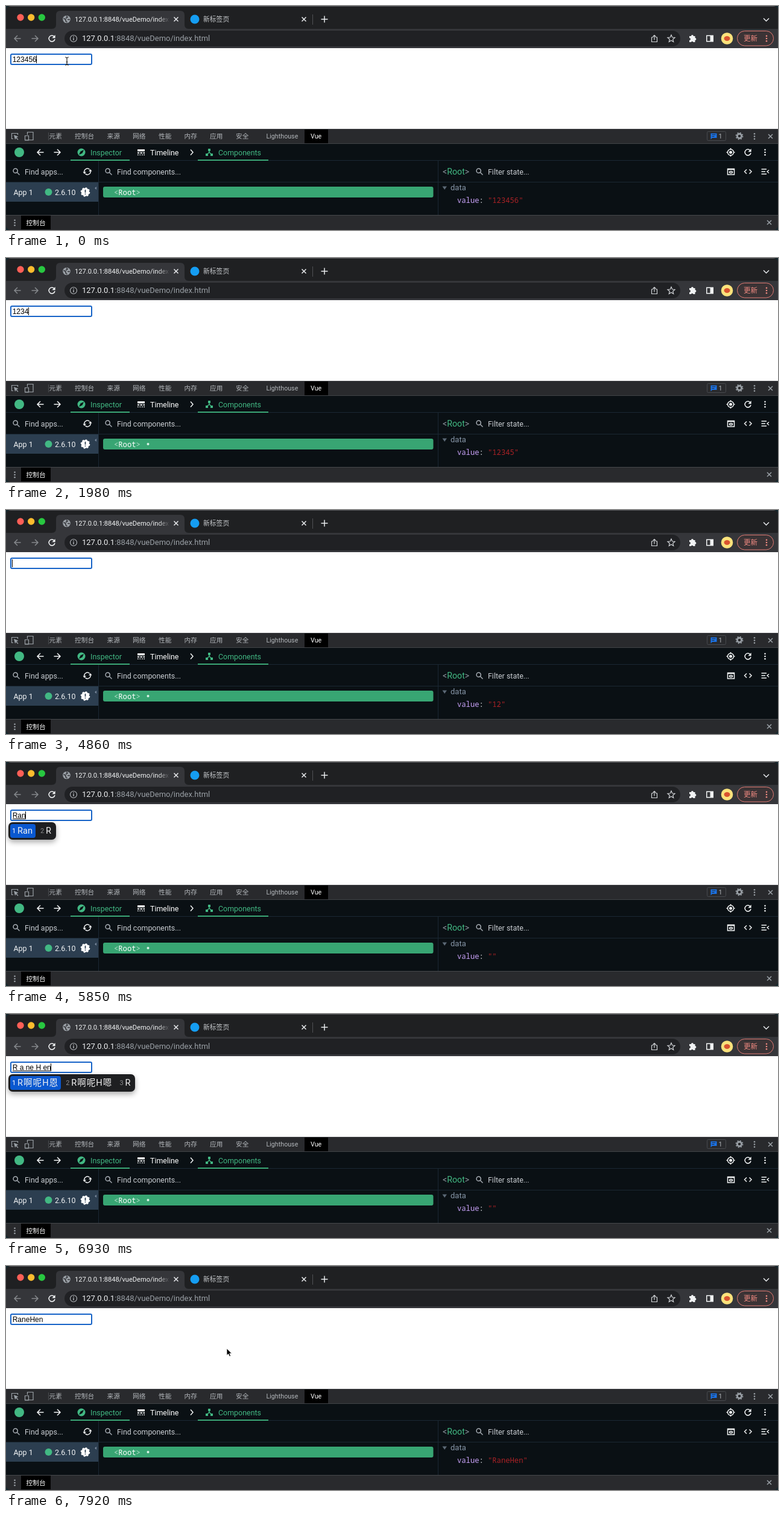
Write an HTML page that moves like this. It is 1280 px wide and 372 px high and loops after 8000 ms.

```html
<!DOCTYPE html>
<html lang="zh-CN">
<head>
<meta charset="utf-8">
<title>Input and component state</title>
<style>
html, body { margin: 0; width: 100%; height: 100%; overflow: hidden; background: #14262d; }
svg { position: absolute; left: 0; top: 0; }
svg, #popup { font-family: Roboto, "Noto Sans CJK SC", "Noto Sans CJK", sans-serif; }
text { white-space: pre; }
.line { fill: none; stroke: currentColor; stroke-width: 1.5; }
.mono { font: 12.2px "Noto Sans Mono", "DejaVu Sans Mono", monospace; }
#field { font: 12px "Liberation Sans", Arial, sans-serif; }
#popup {
  position: absolute; left: 4px; top: 100px; height: 29px; box-sizing: border-box;
  padding: 3px; display: flex; gap: 5px; border-radius: 7px; background: #1e1f21;
  box-shadow: 0 4px 10px #0005; color: #f2f2f2; font-size: 14.6px; line-height: 23px;
}
#popup span { display: flex; padding: 0 5px 0 3px; border-radius: 4px; white-space: nowrap; }
#popup span.cjk { letter-spacing: 1px; padding-right: 4px; }
#popup i { width: 9px; font: 11px/24px Roboto, sans-serif; color: #8b8c8e; }
#popup span:first-child { background: #0a58d0; }
#popup span:first-child i { color: #fff; }
</style>
</head>
<body>
<svg width="1280" height="372" viewBox="0 0 1280 372">
  <defs>
    <clipPath id="window"><rect width="1280" height="372" rx="8"/></clipPath>
    <linearGradient id="fade" gradientUnits="userSpaceOnUse" x1="252" x2="271">
      <stop stop-color="#f1f3f4"/><stop offset="1" stop-color="#f1f3f4" stop-opacity="0"/>
    </linearGradient>
    <path id="close" class="line" d="M-3.5-3.5 3.5 3.5M3.5-3.5-3.5 3.5"/>
    <path id="arrow" class="line" d="M5.5 0H-5M0-5-5 0 0 5"/>
    <g id="reload"><path class="line" d="M4.3-2.7A5 5 0 1 0 5 1"/><path d="M5.6-6V-.8H.4z" fill="currentColor"/></g>
    <g id="dots" fill="currentColor"><circle cy="-4.3" r="1.3"/><circle r="1.3"/><circle cy="4.3" r="1.3"/></g>
    <g id="search" class="line"><circle cx="-1.3" cy="-1.3" r="3.6"/><path d="M1.5 1.5 5.5 5.5"/></g>
  </defs>
  <g clip-path="url(#window)">
    <!-- tab strip -->
    <rect width="1280" height="372" fill="#1f2022"/>
    <path d="M0 .5H1280" stroke="#55575a"/>
    <circle cx="24" cy="19" r="5.7" fill="#ff5f57"/>
    <circle cx="41.7" cy="19" r="5.7" fill="#febc2e"/>
    <circle cx="59.3" cy="19" r="5.7" fill="#28c840"/>
    <path d="M0 38H76Q83 38 83 31V15Q83 8 90 8H289Q296 8 296 15V31Q296 38 303 38H1280V70H0z" fill="#35363a"/>
    <circle cx="100.5" cy="22" r="6.3" fill="#9aa0a6"/>
    <path d="M95.5 20.5 99 22.5V25L101.500 27M100 16.500 102 18.500 99 20.500M102 22.500H106" fill="none" stroke="#35363a" stroke-width="1.6"/>
    <text x="114" y="26" font-size="11.1" fill="url(#fade)">127.0.0.1:8848/vueDemo/index</text>
    <circle cx="313" cy="22" r="7.5" fill="#159df2"/>
    <g color="#e8eaed">
      <use href="#close" x="282" y="22"/><use href="#close" x="494" y="22"/>
      <path class="line" d="M522.500 22H533.500M528 16.500V27.500M1256 20.500 1260.500 25 1265 20.500"/>
    </g>
    <path d="M508.500 14V31" stroke="#505256"/>
    <text x="327" y="26" font-size="10.8" fill="#c8cbce">新标签页</text>

    <!-- toolbar -->
    <rect x="97" y="41" width="1021" height="26" rx="13" fill="#202124"/>
    <use href="#arrow" x="19" y="54" color="#85888c"/>
    <use href="#arrow" transform="translate(48 54) scale(-1 1)" color="#85888c"/>
    <use href="#reload" x="76" y="54" color="#f1f3f4"/>
    <g color="#b0b4b8">
      <circle class="line" cx="112" cy="54" r="5.5" style="stroke-width:1.2"/>
      <path class="line" d="M112 53V57M112 50.500V52"/>
    </g>
    <text x="126" y="58" font-size="13" fill="#9aa0a6"><tspan fill="#f1f3f4">127.0.0.1</tspan>:8848/vueDemo/index.html</text>
    <g color="#d0d3d6">
      <path class="line" style="stroke-width:1.2" d="M1073 52H1070.500V59.500H1079.500V52H1077M1075 56.500V48.500M1072.500 51 1075 48.500 1077.500 51"/>
      <path class="line" style="stroke-width:1.2" d="M1103 48 1104.700 52 1109 52.400 1105.700 55.200 1106.700 59.500 1103 57.200 1099.300 59.500 1100.300 55.200 1097 52.400 1101.300 52z"/>
    </g>
    <path d="M1133 50H1136A1.900 1.900 0 0 1 1139.800 50H1142.500V53A1.900 1.900 0 0 1 1142.500 56.800V60H1139.500A1.900 1.900 0 0 0 1136 60H1133V57A1.900 1.900 0 0 0 1133 53z" fill="#f1f3f4"/>
    <path d="M1161 48.500H1173V59.500H1161zM1162.500 50V58H1167.500V50z" fill="#f1f3f4" fill-rule="evenodd"/>
    <circle cx="1195.500" cy="54" r="9.800" fill="#fbe27b"/>
    <ellipse cx="1195.500" cy="54" rx="5" ry="4" fill="#d8532f"/>
    <rect x="1212.500" y="41.500" width="60" height="24.500" rx="12.200" fill="#3b3335" stroke="#e27b74"/>
    <text x="1223" y="58" font-size="11.500" fill="#f28b82">更新</text>
    <use href="#dots" x="1261" y="54" color="#f28b82"/>

    <!-- page -->
    <rect y="70" width="1280" height="134" fill="#fff"/>
    <rect x="8" y="80" width="134" height="17" rx="2" fill="#fff" stroke="#1663c7" stroke-width="2"/>
    <text id="field" x="10.700" y="93"></text>
    <path id="underline" stroke="#000"/>
    <path id="caret" stroke="#000"/>

    <!-- panel tabs -->
    <rect y="204" width="1280" height="25" fill="#292a2d"/>
    <path d="M0 204.500H1280M0 228.500H1280" stroke="#414347"/>
    <rect x="495" y="205" width="39" height="23" fill="#000"/>
    <path d="M70.500 210V223" stroke="#4a4c50"/>
    <g color="#9aa0a6">
      <path class="line" style="stroke-width:1.200" d="M12 220.500H9.500V211.500H19.500V214M31.500 216V223H38M35.500 214V209.500H45V222.500H38M31.500 215.500H37.500V222.500H31.500z"/>
      <path d="M13 214 20.500 217 17.500 218.500 20.500 221.500 19.500 222.500 16.500 219.500 15 222z" fill="currentColor"/>
      <circle class="line" cx="1216" cy="216" r="3.600" style="stroke-width:2.600"/>
      <circle class="line" cx="1216" cy="216" r="5.600" style="stroke-dasharray:2.200 2.200"/>
      <use href="#dots" x="1241" y="216.500"/><use href="#close" x="1267.500" y="216.500"/>
    </g>
    <g font-size="10.700" fill="#b3b7bb">
      <text x="71.500" y="220">元素</text><text x="114" y="220">控制台</text><text x="167.500" y="220">来源</text>
      <text x="210" y="220">网络</text><text x="253" y="220">性能</text><text x="295.500" y="220">内存</text>
      <text x="338" y="220">应用</text><text x="381" y="220">安全</text><text x="431.500" y="220">Lighthouse</text>
      <text x="505" y="220" fill="#fff">Vue</text><text x="1181.500" y="220">1</text>
    </g>
    <rect x="1162.500" y="208.500" width="31" height="15" rx="2" fill="none" stroke="#484a4e"/>
    <path d="M1168.500 211.500H1178.500V219H1171L1168.500 221.500z" fill="#1a73e8"/>
    <path d="M1170.500 213.700H1176.500M1170.500 216.500H1174.500" stroke="#292a2d"/>

    <!-- inspector -->
    <rect y="229" width="1280" height="118" fill="#0a1014"/>
    <path d="M0 256.500H1280M0 292.500H1280M153.500 257V347M716.500 257V347" stroke="#1b2833"/>
    <path d="M107 256H205M318 256H435" stroke="#3ba776" stroke-width="2"/>
    <rect y="293" width="153" height="32" fill="#2c3e50"/>
    <rect x="161" y="300" width="547.500" height="18" rx="3" fill="#38a573"/>
    <circle cx="22" cy="243" r="8" fill="#42b883"/>
    <circle cx="70.500" cy="309" r="6" fill="#42b883"/>
    <g color="#f1f3f4">
      <use href="#arrow" x="57" y="243"/>
      <use href="#arrow" transform="translate(85 243) scale(-1 1)"/>
      <path class="line" d="M306 238.500 310 243 306 247.500"/>
      <path d="M218 238H230V241.500H218zM218 243H221V245H218zM222.500 243H226V245H222.500zM227.500 243H230V245H227.500zM218 246.500H219.700V248H218zM221.500 246.500H223.200V248H221.500zM225 246.500H226.700V248H225zM228.300 246.500H230V248H228.300z" fill="currentColor"/>
      <circle class="line" cx="1201.500" cy="243" r="5"/><circle cx="1201.500" cy="243" r="2.500" fill="currentColor"/>
      <path class="line" d="M1201.500 236V238.500M1201.500 247.500V250M1194.500 243H1197M1206 243H1208.500"/>
      <use href="#reload" x="1230" y="243"/><use href="#dots" x="1258.500" y="243"/>
      <path class="line" d="M130 276A5 5 0 0 1 138.500 271.500M140 274A5 5 0 0 1 131.500 278.500"/>
      <path d="M127.500 275.500H133L130 279zM137 274.500H142.500L140 271z" fill="currentColor"/>
      <path class="line" d="M1196.500 270.500H1207.500V280H1196.500zM1196.500 271.500H1207.500M1228 271.500 1224.500 275 1228 278.500M1232.500 271.500 1236 275 1232.500 278.500M1252.500 271H1261M1252.500 275H1259M1252.500 279H1261M1265 272.500 1262 275 1265 277.500"/>
      <ellipse class="line" cx="1202" cy="276" rx="2.500" ry="1.500"/>
    </g>
    <g color="#42b883">
      <circle cx="125" cy="243" r="6.500" fill="currentColor"/>
      <path d="M129 239 126.500 244.500 121 247 123.500 241.500z" fill="#0a1014"/>
      <path class="line" d="M337 239V243L332.500 247M337 243 341.500 247"/>
      <path d="M335 237H339V241H335zM331 245H335V249H331zM339 245H343V249H339z" fill="currentColor"/>
    </g>
    <g color="#a5abb2">
      <use href="#search" x="17" y="275"/><use href="#search" x="170" y="275"/><use href="#search" x="785" y="275"/>
    </g>
    <circle cx="131.500" cy="309" r="6.700" fill="#fff"/>
    <circle cx="131.500" cy="309" r="6.800" fill="none" stroke="#fff" stroke-width="2" stroke-dasharray="2.700 2.640"/>
    <path d="M131.500 305V310M131.500 311.500V313" stroke="#2c3e50" stroke-width="1.700"/>
    <path d="M150 300V305L147 302.500z" fill="#78889a"/>
    <path d="M723.500 299.500H731L727.200 305z" fill="#5c6976"/>
    <g font-size="12.450" fill="#c9cdd2">
      <g fill="#42b883"><text x="140" y="247.500">Inspector</text><text x="352" y="247.500">Components</text></g>
      <text x="239" y="247.500" fill="#fff">Timeline</text>
      <text x="31" y="279.500">Find apps...</text><text x="184" y="279.500">Find components...</text>
      <text x="799" y="279.500">Filter state...</text>
      <text x="12.500" y="313.500" fill="#f1f3f4">App 1</text><text x="81" y="313.500" fill="#f1f3f4">2.6.10</text>
      <text x="737" y="306" font-size="13" fill="#8796a8">data</text>
      <text x="724" y="280" font-size="14.200" fill="#42b883"><tspan fill="#8a939c">&lt;</tspan>Root<tspan fill="#8a939c">&gt;</tspan></text>
    </g>
    <text class="mono" x="179" y="313.500" fill="#fff"><tspan fill="#b5dfca">&lt;</tspan>Root<tspan fill="#b5dfca">&gt;</tspan></text>
    <circle id="changed" cx="235.500" cy="309" r="2" fill="#d9f2e6"/>
    <text class="mono" x="748" y="327" fill="#c6a0f6">value<tspan fill="#e0e3e6">:</tspan></text>
    <text class="mono" id="state" x="799" y="327" fill="#ab2226"></text>

    <!-- drawer -->
    <rect y="347" width="1280" height="25" fill="#292a2d"/>
    <path d="M0 347.500H1280" stroke="#46484c"/>
    <rect x="25" y="348" width="49" height="23" fill="#000"/>
    <use href="#dots" x="14.500" y="360" color="#9aa0a6"/>
    <use href="#close" x="1265.500" y="359.500" color="#9aa0a6"/>
    <text x="33.500" y="363.500" font-size="10.700" fill="#fff">控制台</text>
  </g>
  <path id="beam" d="M98 85Q101 85 101 87Q101 85 104 85M101 86V97M98 98Q101 98 101 96Q101 98 104 98M99.500 93H102.500" fill="none" stroke="#222" stroke-width="1.200"/>
  <path id="pointer" d="M0 0V11.500L2.700 9 4.500 13.200 6.600 12.300 4.800 8.200H8.400z" fill="#000" stroke="#fff" stroke-width=".8"/>
</svg>
<div id="popup"></div>
<script>
const $ = id => document.getElementById(id);
const show = (id, on) => $(id).style.display = on ? '' : 'none';

const LOOP = 8000, LAG = 700, MOVE = 7450;

// time, field text, input-method candidates while composing
const log = [
  [0, '123456'], [1000, '12345'], [1600, '1234'], [2200, '123'], [2700, '12'],
  [4300, '1'], [4700, ''],
  [5250, 'R', 'R'], [5450, 'Ra', 'Ra R'], [5700, 'Ran', 'Ran R'],
  [6000, 'R a ne', 'R啊呢 R'], [6350, 'R a ne H', 'R啊呢H R'],
  [6600, 'R a ne H e', 'R啊呢H额 R啊呢H鹅 R'], [6800, 'R a ne H en', 'R啊呢H恩 R啊呢H嗯 R'],
  [7100, 'RaneHen']
];
let shown;

function showCandidates(list) {
  if (list === shown) return;
  shown = list;
  $('popup').innerHTML = list.split(' ').map((word, i) =>
    `<span class="${/[^\w]/.test(word) ? 'cjk' : ''}"><i>${i + 1}</i>${word}</span>`).join('');
  show('popup', list);
}

function draw(t) {
  const [since, text, list = ''] = log.findLast(e => e[0] <= t);
  const state = log.findLast(e => !e[2] && e[0] <= Math.max(0, t - LAG))[1];

  $('field').textContent = text;
  const end = 11 + $('field').getComputedTextLength();
  $('caret').setAttribute('d', `M${Math.round(end) - .5} 82V95`);
  show('caret', (t - since) % 1000 < 500);
  $('underline').setAttribute('d', `M11 94.5H${end}`);
  show('underline', list);
  showCandidates(list);

  $('state').textContent = `"${state}"`;
  show('changed', t >= log[1][0] + LAG);

  show('beam', t < log[1][0]);
  show('pointer', t >= MOVE);
  const far = (1 - Math.min(1, Math.max(0, (t - MOVE) / 430))) ** 3;
  $('pointer').setAttribute('transform', `translate(${366 - 200 * far} ${137 - 32 * far})`);
}

const start = performance.now();
function tick() {
  draw((performance.now() - start) % LOOP);
  requestAnimationFrame(tick);
}
tick();
</script>
</body>
</html>
```
